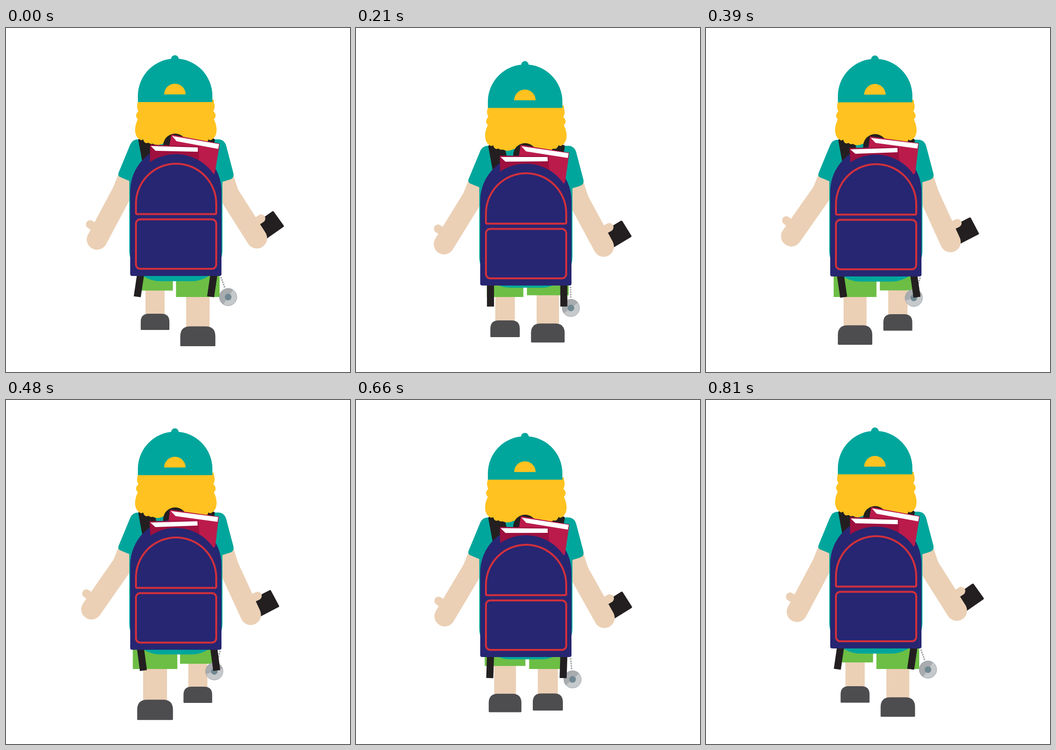
An HTML page for the animation above (0.84 s loop, 720x720 px).

```html
<!DOCTYPE html>
<html lang="en">
<head>
<meta charset="utf-8">
<title>Walking with a backpack</title>
<style>
  html, body { margin: 0; width: 100%; height: 100%; overflow: hidden; background: #fff; }
  svg { display: block; width: 100%; height: 100%; }
  .skin { fill: #ebd0b5; }
  .limb { fill: none; stroke: #ebd0b5; stroke-width: 43; stroke-linecap: round; }
  .thumb { stroke-width: 17.5; }
  .teal { fill: #00a69c; }
  .hair { fill: #ffc220; }
  .black { fill: #231f20; }
  .navy { fill: #272672; }
  .seam { fill: none; stroke: #d2303b; stroke-width: 4; stroke-linejoin: round; }
</style>
</head>
<body>
<svg viewBox="0 0 720 720">
  <defs>
    <g id="leg">
      <rect class="skin" x="-20" y="-95" width="40" height="80"/>
      <path fill="#4d4d50" d="M-30 -17Q-30 -34 -13 -34H13Q30 -34 30 -17V-1.5Q30 0 28.5 0H-28.5Q-30 0 -30 -1.5Z"/>
    </g>
    <rect id="shorts" x="-37.3" y="-60" width="74.6" height="60" fill="#6cbe45"/>
    <rect id="strap" class="black" x="-7.4" y="-10" width="14.8" height="56"/>
  </defs>

  <use href="#leg" id="legL"/>
  <use href="#leg" id="legR"/>
  <use href="#shorts" id="shortsL"/>
  <use href="#shorts" id="shortsR"/>

  <g id="body">
    <path class="limb" d="M244 342L265 290M466 347L450 298"/>
    <g id="armL">
      <path class="limb thumb" d="M176 411L192 421"/>
      <path class="limb" d="M244 342L190.5 442.5"/>
    </g>
    <g id="armR">
      <path class="black" stroke="#231f20" stroke-width="5" stroke-linejoin="round" d="M558.5 386L579 414.5L545.5 438L525 409.5Z"/>
      <path class="limb thumb" d="M534 399L520 408"/>
      <path class="limb" d="M466 347L525 440"/>
    </g>
    <path class="teal" d="M276 233H444Q457 233 461 247L476 304Q478 314 469 317L453 322V465A65 65 0 0 1 388 530H323A65 65 0 0 1 258 465V320L239 312Q233 309 236 302L260 244Q265 233 276 233Z"/>
    <path class="black" d="M277 235Q277 231 281 231L308 225L318 265L286 284ZM437 235Q437 231 433 231L406 225L396 265L428 284Z"/>
  </g>

  <g id="head">
    <path class="hair" d="M276 150V155Q272 165 277 174Q268 183 276 191C269 204 266 226 281 234Q284 236 287 233Q290 244 298 240Q303 244 307 242Q317 248 330 241H379Q386 247 395 243Q407 246 413 240Q420 243 424 233Q427 236 430 234C445 226 442 204 435 191Q443 183 434 174Q439 165 435 155V150Z"/>
    <circle class="teal" cx="353.5" cy="65" r="8"/>
    <path class="teal" d="M276 155V142A78 78 0 0 1 432 142V155Z"/>
    <path class="hair" d="M331 139A22.500 22.500 0 0 1 376 139Z"/>
  </g>

  <g id="bag">
    <g id="charm">
      <path d="M449 523V548" fill="none" stroke="#a3a5a8" stroke-width="3.6" stroke-linecap="round" stroke-dasharray="0 5"/>
      <circle cx="449" cy="566" r="18.3" fill="#c6c9cb"/>
      <path d="M434 577A18.5 18.5 0 0 1 464 555Z" fill="#a9acaf"/>
      <circle cx="449" cy="566" r="18.1" fill="none" stroke="#9a9da0" stroke-width=".8"/>
      <circle cx="449" cy="566" r="7" fill="#718993"/>
    </g>
    <use href="#strap" id="strapL"/>
    <use href="#strap" id="strapR"/>
    <path class="black" d="M329 251V246A25 25 0 0 1 379 246V270H329Z"/>
    <path class="navy" d="M260 400V341.500A95.5 95.5 0 0 1 451 341.500V400Z"/>
    <g id="bookR">
      <path fill="#bb1b4b" d="M346 223L447.500 242L437 304L400 330L337 275Z"/>
      <path fill="#fff" d="M347.500 226L446 243L444 253L357 237Z"/>
    </g>
    <g id="bookL">
      <path fill="#9f103f" d="M301.500 244L404 248V285L301.500 292Z"/>
      <path fill="#fff" d="M303 247L401.500 250V259L313 257Z"/>
    </g>
    <path class="navy" d="M260 359.5A95.5 95.5 0 0 1 451 359.5V515Q451 519 447 519H264Q260 519 260 515Z"/>
    <path class="seam" d="M272 368A84 84 0 0 1 440 368V387Q440 389.500 437.500 389.500H274.500Q272 389.500 272 387Z"/>
    <rect class="seam" x="272" y="400.500" width="168" height="103.500" rx="9"/>
  </g>
</svg>
<script>
const LOOP = 840, STEP = 30, HALF = LOOP / 2;

const clamp = (v, low, high) => Math.min(high, Math.max(low, v));
const wave = (t, period) => Math.cos(2 * Math.PI * t / period);
const bobAt = t => (1 - wave(t, HALF)) / 2;

const place = (id, transform) =>
  document.getElementById(id).setAttribute('transform', transform);
const shift = (id, y) => place(id, `translate(0 ${y})`);
const turn = (id, angle, x, y) => place(id, `rotate(${angle} ${x} ${y})`);

// The leg bobs with the body while lifted, then grows as it steps back and lands
function poseLeg(side, x, t) {
  const near = (1 + wave(clamp(t - 495, -360, 360), 720)) / 2;
  const lift = t < HALF ? bobAt(t) : 0;
  const drop = clamp(0.95 + 0.9 * wave(t - 390, LOOP), 0, 1);
  const scale = 1 + near / 4;
  place('leg' + side, `translate(${x} ${632 + 38 * near + 11 * lift}) scale(${scale})`);
  place('shorts' + side, `translate(${x} ${548.5 + 14.5 * drop}) scale(${scale} 1)`);
}

function pose(t) {
  const sway = wave(t, LOOP);
  const swing = (1 - sway) / 2;
  const bob = bobAt(t);

  shift('head', 12.3 * bob);
  shift('body', 13.4 * bob);
  shift('bag', 20 * bob);

  turn('armL', 7.2 * swing, 244, 342);
  turn('armR', 8 * swing, 466, 347);
  turn('bookL', -3.5 * swing, 402, 266);
  turn('bookR', -2.8 * swing, 406, 283);
  turn('charm', -1 - 18.9 * sway, 449, 519);
  place('strapL', `translate(281.5 517) rotate(${8.5 * sway})`);
  place('strapR', `translate(435 517) rotate(${8.5 * sway})`);

  poseLeg('L', 312, t);
  poseLeg('R', 401.5, (t + HALF) % LOOP);
}

const start = performance.now();
function tick() {
  const elapsed = (performance.now() - start) % LOOP;
  pose(Math.floor(elapsed / STEP) * STEP);
  requestAnimationFrame(tick);
}
tick();
</script>
</body>
</html>
```
